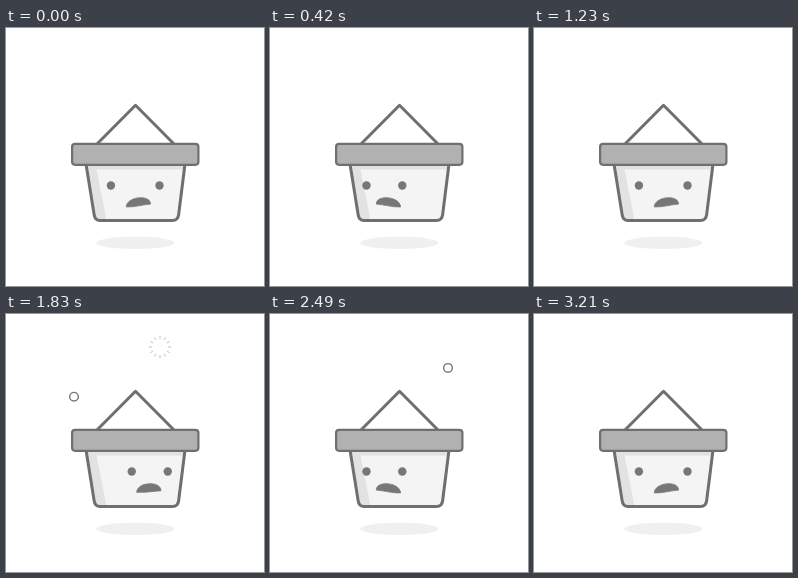
An HTML page for the animation above (3420 ms loop, 258 px wide and 258 px high).

```html
<!DOCTYPE html>
<html lang="en">
<head>
<meta charset="utf-8">
<title>Empty basket</title>
<style>
  html, body { margin: 0; width: 100%; height: 100%; overflow: hidden; background: #fff; }
  svg { display: block; width: 100%; height: 100%; }
</style>
</head>
<body>
<svg viewBox="0 0 258 258">
  <ellipse cx="129.3" cy="214.8" rx="39.3" ry="6.2" fill="#f0f0f0"/>
  <path d="M91 116 129.5 77.3 168 116" fill="none" stroke="#6f6f6f" stroke-width="3" stroke-linejoin="round"/>
  <path d="M80 136 88.2 187Q89 192.5 94 192.5H166.5Q171.8 192.5 172.6 187L179 136Z" fill="#e2e2e2"/>
  <path d="M90.5 141.5H178.3L172.6 187Q171.8 192.5 166.5 192.5H100.5Z" fill="#f4f4f4"/>
  <path d="M80 136 88.2 187Q89 192.5 94 192.5H166.5Q171.8 192.5 172.6 187L179 136" fill="none" stroke="#6f6f6f" stroke-width="3"/>
  <rect x="66.1" y="115.8" width="126.3" height="21" rx="3" fill="#b1b1b1" stroke="#6f6f6f" stroke-width="2.2"/>
  <g fill="#777">
    <circle id="eyeL" cy="157.5" r="4.2"/>
    <circle id="eyeR" cy="157.5" r="4.2"/>
    <path id="mouth" stroke="#777" stroke-width=".8" stroke-linejoin="round"/>
  </g>
  <g id="sparks" fill="none" stroke="#777"></g>
</svg>
<script>
const LOOP = 3420;
const $ = id => document.getElementById(id);
const clamp = v => Math.min(1, Math.max(0, v));
const mix = (a, b, k) => a + (b - a) * k;
const inOut = k => k * k * (3 - 2 * k);
const out = k => 1 - (1 - k) ** 2;
// progress of a phase that begins at a given time and lasts a while
const phase = (t, at, length) => clamp((t - at) / length);

// each look to a side (turn -1, 0, 1) sets off a few sparks
const looks = [
  { at: 0, turn: -1, bubble: [48.8, 51], burst: [196, 82] },
  { at: 735, turn: 0, burst: [54, 53] },
  { at: 1665, turn: 1, bubble: [68, 67], burst: [154, 33] },
  { at: 2235, turn: -1, bubble: [178, 44.5] },
  { at: 2805, turn: 0, bubble: [73.8, 51] }
];

// left corner, peak, right corner and underside, with curve handles
const frown = [
  [-12.3, 4.6], [-12, -1], [-5, -4.6], [2, -4.6], [8, -4.6],
  [12, -2.5], [12, 1.8], [5, 2.2], [-5, 5.2], [-12.3, 4.6]
];
// same outline mirrored, points kept in matching order
const mirrored = frown.map((_, i) => {
  const [x, y] = frown[(15 - i) % 9];
  return [-x, y];
});

function add(tag, width) {
  const el = document.createElementNS('http://www.w3.org/2000/svg', tag);
  el.setAttribute('stroke-width', width);
  return $('sparks').appendChild(el);
}

function drawFace(t) {
  let turn = 0, side = 0, flip = 0;
  for (const look of looks) {
    const k = inOut(phase(t, look.at, 180));
    const late = inOut(phase(t, look.at + 110, 180));
    const away = Math.abs(look.turn);
    turn = mix(turn, look.turn, k);
    side = mix(side, away, k);
    flip = mix(flip, away, late);
  }
  const mid = 129.2 + 14.8 * turn;
  const half = 24.3 - 6.4 * side;
  $('eyeL').setAttribute('cx', mid - half);
  $('eyeR').setAttribute('cx', mid + half);

  const mouthX = 132.5 + 12.4 * turn - 1.8 * side;
  const [first, ...rest] = frown.map(([x, y], i) => [
    mouthX + mix(x, mirrored[i][0], flip),
    174.3 + mix(y, mirrored[i][1], flip)
  ]);
  $('mouth').setAttribute('d', `M${first}C${rest}Z`);
}

function drawBubble(el, [x, y], k) {
  el.setAttribute('cx', x);
  el.setAttribute('cy', y + 21 * (1 - k));
  el.setAttribute('r', 4.3 * clamp(k * 5));
}

function drawBurst(el, [x, y], k) {
  const e = out(k);
  const inner = 18 * e ** 1.2;
  const outer = 4 + 14 * e;
  let d = '';
  for (let i = 0; i < 12; i++) {
    const a = i * Math.PI / 6;
    const at = r => `${x + r * Math.cos(a)} ${y + r * Math.sin(a)}`;
    d += `M${at(inner)}L${at(outer)}`;
  }
  el.setAttribute('d', d);
}

const sparks = [];
for (const { at, bubble, burst } of looks) {
  if (bubble) sparks.push({ el: add('circle', 1.4), from: at + 90, length: 300, pos: bubble, paint: drawBubble, alpha: 1 });
  if (burst) sparks.push({ el: add('path', 0.8), from: at + 45, length: 400, pos: burst, paint: drawBurst, alpha: 0.6 });
}

function draw(t) {
  drawFace(t);
  for (const { el, from, length, pos, paint, alpha } of sparks) {
    const k = phase(t, from, length);
    paint(el, pos, k);
    el.setAttribute('opacity', k > 0 ? alpha * clamp((1 - k) * 3) : 0);
  }
}

const start = performance.now();
function tick() {
  draw((performance.now() - start) % LOOP);
  requestAnimationFrame(tick);
}
tick();
</script>
</body>
</html>
```
